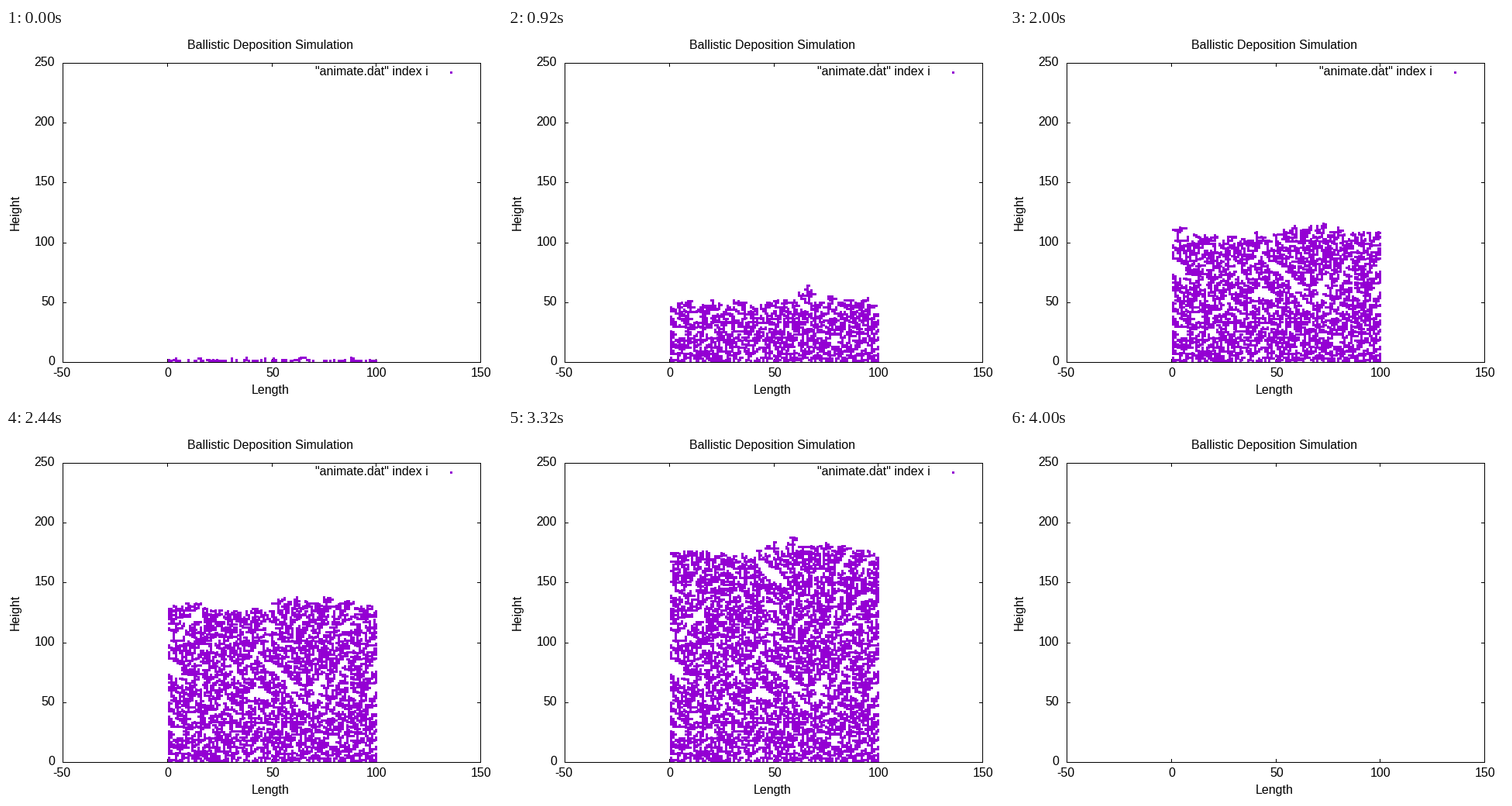
These frames come from a looping animation (640 px wide and 480 px high, 4040 ms). A matplotlib script:

```python
import numpy as np
import matplotlib.pyplot as plt
from matplotlib.animation import FuncAnimation

W, H, DPI = 640, 480, 80
FRAMES, STEP_MS = 101, 40
LEFT, RIGHT, TOP, BOTTOM = 73, 612, 45, 431
PURPLE = (148, 0, 211)
COLS = 100
GROWTH = 2.11  # mean rise of the surface per step

plt.rcParams["font.family"] = "Liberation Sans"
plt.rcParams["font.size"] = 16 * 72 / DPI


def px(x):
    return np.floor(LEFT + (x + 50) * (RIGHT - LEFT) / 200 + 0.5).astype(int)


def py(y):
    return np.floor(BOTTOM - y * (BOTTOM - TOP) / 250 + 0.5).astype(int)


def bump(x, centre, width):
    return np.exp(-((x - centre) / width) ** 2)


def deposit():
    """Ballistic deposition; returns column, height and step of each particle."""
    rng = np.random.default_rng(7)
    cols = np.arange(1, COLS + 1)
    # the surface leans towards a low hill and a shallow valley
    lean = 9 * bump(cols, 65, 14) - 4 * bump(cols, 38, 14)
    h = np.zeros(COLS + 2, int)  # one empty column beyond each wall
    surface = h[1:-1]
    found = []
    for step in range(FRAMES - 1):
        gap = lean * min(1, step / 30) - surface
        gap = np.convolve(gap - gap.mean(), np.ones(15) / 15, "same")
        weight = np.exp(np.clip(0.1 * gap, -1, 1))
        for c in rng.choice(cols, 300, p=weight / weight.sum()):
            if surface.mean() >= 1.2 + GROWTH * step:
                break
            h[c] = max(h[c - 1], h[c] + 1, h[c + 1])
            found.append((c, h[c], step))
    return np.array(found).T


def stamp(img, x, y):
    for dx in (-1, 0, 1):
        for dy in (-1, 0, 1):
            img[y + dy, x + dx] = PURPLE


def make_base():
    img = np.full((H, W, 3), 255, np.uint8)
    img[[TOP, BOTTOM], LEFT:RIGHT + 1] = 0
    img[TOP:BOTTOM + 1, [LEFT, RIGHT]] = 0
    for x in px(np.arange(-50, 151, 50)):
        img[TOP:TOP + 5, x] = 0
        img[BOTTOM - 4:BOTTOM + 1, x] = 0
    for y in py(np.arange(0, 251, 50)):
        img[y, LEFT:LEFT + 5] = 0
        img[y, RIGHT - 4:RIGHT + 1] = 0
    return img


part_x, part_h, part_step = deposit()
dot_x, dot_y = px(part_x), py(part_h)
base = make_base()

fig = plt.figure(figsize=(W / DPI, H / DPI), dpi=DPI, facecolor="white")
ax = fig.add_axes([0, 0, 1, 1])
ax.axis("off")
picture = ax.imshow(base, extent=(0, W, H, 0), interpolation="nearest", aspect="auto")
ax.set_xlim(0, W)
ax.set_ylim(H, 0)


def label(x, y, s, ha="center", **kw):
    return ax.text(x, y, s, ha=ha, va="baseline", color="black", **kw)


label(341.5, 27, "Ballistic Deposition Simulation")
label(341.5, 472, "Length")
label(16.5, 237.5, "Height", rotation=90, rotation_mode="anchor")
for v in range(-50, 151, 50):
    label(px(v) + np.sign(v + 1), 450, str(v))
for v in range(0, 251, 50):
    label(63, py(v) + 4, str(v), ha="right")
key = label(545, 61, '"animate.dat" index i', ha="right")


def update(i):
    img = base.copy()
    growing = i < FRAMES - 1
    key.set_visible(growing)
    if growing:
        stamp(img, 574, 57)
        now = part_step <= i
        stamp(img, dot_x[now], dot_y[now])
    picture.set_data(img)
    return picture, key


anim = FuncAnimation(fig, update, frames=FRAMES, interval=STEP_MS,
                     repeat=True, repeat_delay=0, blit=False)
plt.show()
```
